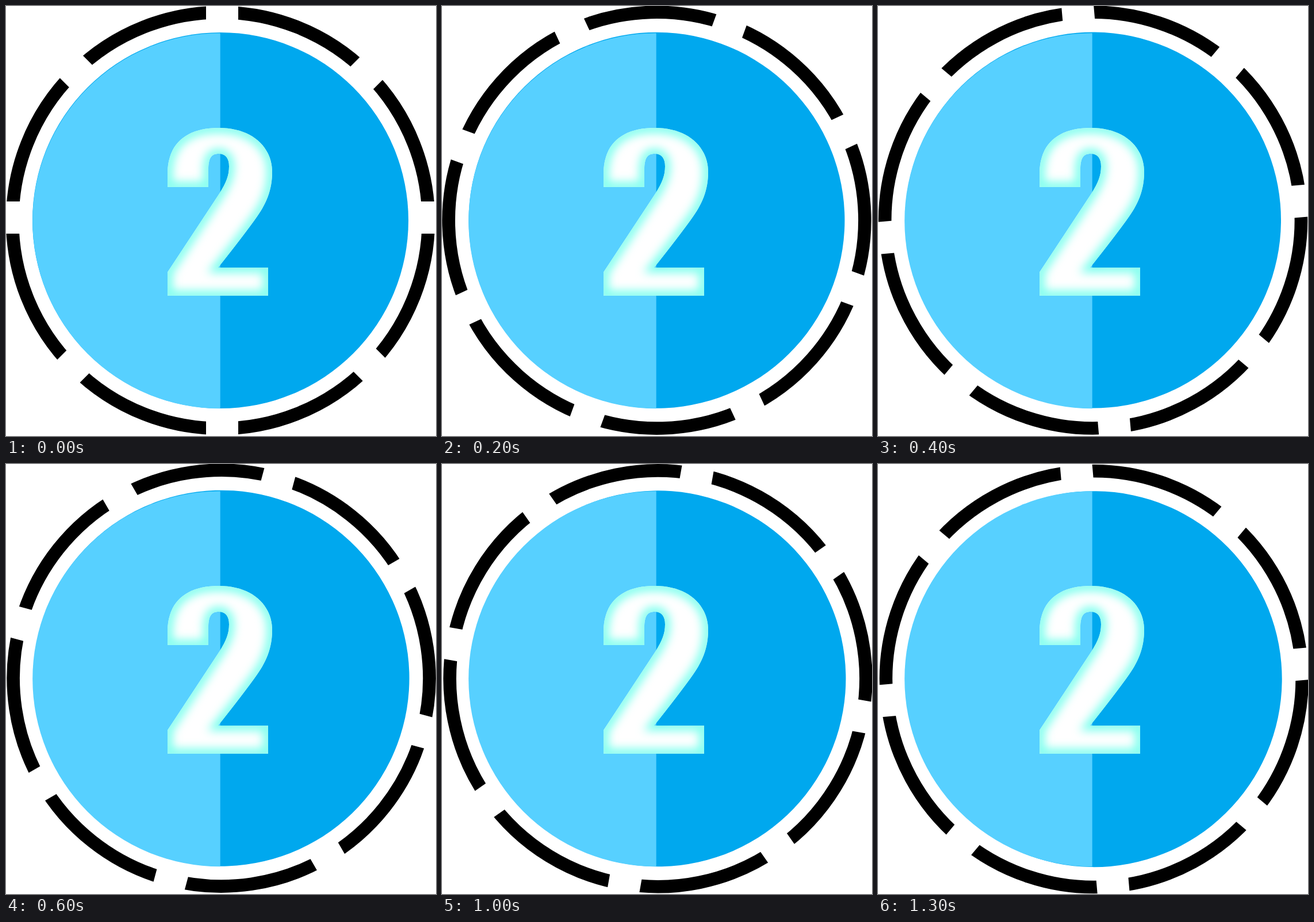
Write an HTML page that moves like this. It is 748 by 748 pixels and loops after 1400 ms.

```html
<!DOCTYPE html>
<html>
<head>
<meta charset="utf-8">
<style>
  html, body { margin: 0; width: 100%; height: 100%; overflow: hidden; background: #fff; }
  svg { display: block; width: 100%; height: 100%; }
</style>
</head>
<body>
<svg viewBox="0 0 748 748">
  <defs>
    <path id="two" d="M281 315V292C281 240 313 212 370 212C428 212 463 245 463 289C463 320 453 345 432 373
      Q408 406 369 455H456V504H281V463L372 325C383 307 388 295 388 279C388 265 382 257 370 257
      C357 257 352 265 352 285V315Z"/>
    <clipPath id="inside"><use href="#two"/></clipPath>
    <filter id="soft" x="-20%" y="-20%" width="140%" height="140%" color-interpolation-filters="sRGB">
      <feGaussianBlur stdDeviation="8"/>
    </filter>
  </defs>

  <!-- The ring is slightly off its pivot, so it wobbles as it turns -->
  <g id="wheel">
    <circle cx="373" cy="373" r="361.9" fill="none" stroke="#000" stroke-width="22.6"/>
    <path d="M376 -60V800M-60 368H800M76 68L676 668M676 68L76 668" stroke="#fff" stroke-width="56"/>
    <circle cx="373" cy="373" r="327" fill="#00a8ee"/>
  </g>

  <path d="M372.7 47.3A326.5 326.5 0 0 0 372.7 700.3Z" fill="#57d0ff"/>

  <use href="#two" fill="#fff"/>
  <g clip-path="url(#inside)">
    <use href="#two" fill="none" stroke="#7fffee" stroke-width="18" filter="url(#soft)"/>
  </g>
</svg>
<script>
  const wheel = document.getElementById("wheel");
  const STEP = 100, LOOP = 1400, TURN = 10;

  function draw() {
    const step = Math.floor(performance.now() % LOOP / STEP);
    wheel.setAttribute("transform", `rotate(${step * TURN} 374.1 374.2)`);
    requestAnimationFrame(draw);
  }
  draw();
</script>
</body>
</html>
```
